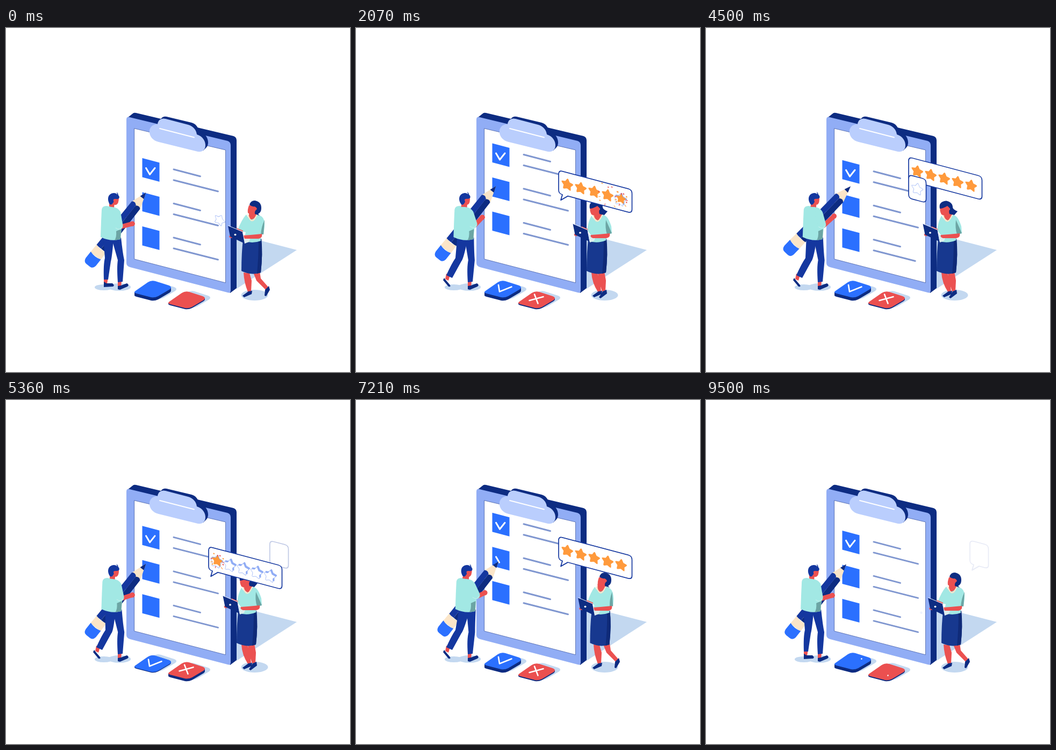
Write an HTML page with a canvas that moves like this. It is 640 px wide and 640 px high and loops after 9570 ms.

```html
<!DOCTYPE html>
<html lang="en">
<head>
<meta charset="utf-8">
<title>Checklist and rating</title>
<style>
html, body { margin: 0; width: 100%; height: 100%; overflow: hidden; background: #fff; }
canvas { display: block; width: 640px; height: 640px; }
</style>
</head>
<body>
<canvas id="stage"></canvas>
<script>
const LOOP = 9.57, ROW = 63.5, SPEED = 2 * ROW / LOOP, SKEW = 0.265;
const BLUE = '#2b70ff', NAVY = '#0d2c82', INK = '#14379f', SKIN = '#eb5151',
  MINT = '#a2e8e4', SHADE = '#6ca5a4', CREAM = '#fbe5c8', PALE = '#91adf5',
  GROUND = '#c3d8f0', ORANGE = '#ff9a3c', LINE = '#8097d0';
const WRITE = [2.2, 6.9]; // when the pencil starts each tick

const canvas = document.getElementById('stage');
const ctx = canvas.getContext('2d');
const dpr = window.devicePixelRatio || 1;
canvas.width = canvas.height = 640 * dpr;

const clamp = x => Math.max(0, Math.min(1, x));
const lerp = (a, b, k) => a + (b - a) * k;
const ramp = (t, a, b) => clamp((t - a) / (b - a));
const smooth = k => k * k * (3 - 2 * k);
const ease = (t, a, b) => smooth(ramp(t, a, b));
const easeOut = k => 1 - (1 - k) ** 3;
const back = k => k <= 0 ? 0 : 1 + 2.2 * (k - 1) ** 3 + 1.2 * (k - 1) ** 2;
// Rises after a, stays at 1, is back at 0 by b
const hold = (t, a, b, d) => ease(t, a, a + d) * (1 - ease(t, b - d, b));

// Blend two path strings that share the same commands
function mix(a, b, k) {
  const nums = b.match(/-?[\d.]+/g);
  let i = 0;
  return a.replace(/-?[\d.]+/g, n => lerp(+n, +nums[i++], k).toFixed(2));
}

function fill(d, color) {
  ctx.fillStyle = color;
  ctx.fill(new Path2D(d));
}

function stroke(d, color, width) {
  ctx.strokeStyle = color;
  ctx.lineWidth = width;
  ctx.stroke(new Path2D(d));
}

function ellipse(x, y, rx, ry, color) {
  ctx.fillStyle = color;
  ctx.beginPath();
  ctx.ellipse(x, y, rx, ry, 0, 0, 7);
  ctx.fill();
}

function at(x, y, draw) {
  ctx.save();
  ctx.translate(x, y);
  draw();
  ctx.restore();
}

// Stroke the part of a polyline between two fractions of its length
function trace(pts, from, to, color, width) {
  if (to <= from) return;
  const seg = pts.slice(1).map((p, i) => Math.hypot(p[0] - pts[i][0], p[1] - pts[i][1]));
  const total = seg.reduce((a, b) => a + b);
  let pos = 0;
  ctx.beginPath();
  seg.forEach((len, i) => {
    const a = clamp((from * total - pos) / len), b = clamp((to * total - pos) / len);
    const point = k => [lerp(pts[i][0], pts[i + 1][0], k), lerp(pts[i][1], pts[i + 1][1], k)];
    if (b > a) {
      ctx.moveTo(...point(a));
      ctx.lineTo(...point(b));
    }
    pos += len;
  });
  ctx.strokeStyle = color;
  ctx.lineWidth = width;
  ctx.stroke();
}

function board() {
  fill('M429 384L541 413L429 485Z', GROUND);
  ellipse(182, 482.5, 17, 5.5, GROUND);
  ellipse(211, 482, 21, 7, GROUND);
  ellipse(462.5, 497, 25, 10, GROUND);
  fill('M226 167L236 159Q238 157 242 158L423 201Q429 203 429 209L429 484L417 493Z', NAVY);
  fill('M224 171Q224 164 230 166L412 210Q418 212 418 218L418 488Q418 494 412 492L231 445Q224 443 224 437Z', PALE);
  const paper = 'M239 187L408.5 227L408.5 474L239 430Z';
  fill(paper, '#fff');
  stroke(paper, '#4760a8', 0.8);
}

function clip() {
  fill('M287 172C289 166 293 164 299 165L345 176C353 178 357 184 359 191C370 195 376 204 376 213C376 221 371 224 367 228Z', NAVY);
  fill('M284 212C262 207 261 179 282 179C283 170 290 167 297 169L339 180C349 183 354 190 355 198C367 202 371 211 371 218C371 227 365 231 357 230Z', '#bacefd');
  stroke('M286 187L350 203.5', '#fff', 2);
}

function row(y, alpha, check, grow, first, second) {
  at(0, y, () => {
    ctx.globalAlpha = alpha;
    at(269.5, 22, () => {
      ctx.scale(grow, grow);
      fill('M-16 -22L16 -13.5L16 22L-16 13.5Z', BLUE);
    });
    trace([[260.5, 18.5], [267.5, 30.5], [277, 18.5]], 0, check, '#fff', 3);
    trace([[312, 21], [361.5, 34]], 0, first, LINE, 3);
    trace([[312, 41], [394.5, 62]], 0, second, LINE, 3);
  });
}

function list(t) {
  const fade = [2.35, 7.5], born = [3.12, 7.6];
  for (let i = 0; i < 5; i++) {
    const alpha = i < 2 ? 1 - ramp(t, fade[i], fade[i] + 0.95) : 1;
    const check = i === 0 ? 1 : i < 3 ? ramp(t - WRITE[i - 1], 0, 0.75) : 0;
    const age = i < 3 ? LOOP : t - born[i - 3];
    if (age < 0 || alpha === 0) continue;
    row(242 + i * ROW - t * SPEED, alpha, check, back(ramp(age, 0, 0.6)),
      easeOut(ramp(age, 0.2, 0.85)), (1 - Math.cos(Math.PI * ramp(age, 0.25, 1.6))) / 2);
  }
}

const TILE = 'M241 489L264 473Q270 469 278 471L303 479Q310 482 305 486L283 499Q277 502 270 501L243 494Q236 492 241 489Z';

function tile(x, base, top, color, marks) {
  at(x + 10, base - 3, () => fill(TILE, GROUND));
  for (let y = base; y > top; y--) at(x, y, () => fill(TILE, NAVY));
  at(x, top, () => {
    fill(TILE, color);
    marks();
  });
}

function tiles(t) {
  const up = clamp(0.6 + 0.8 * Math.cos(2 * Math.PI * (4 * t / LOOP - 0.87)));
  const mark = (pts, on, off, gone) =>
    trace(pts, ease(t, off, gone), ease(t, on, on + 0.5), '#fff', 2.6);
  tile(0, 6, 5 - 5 * up, BLUE, () =>
    mark([[265, 478], [267, 490.5], [289.5, 481.5]], 0.2, 8.2, 9.55));
  tile(63, 22, 17 + 3 * up, '#eb5050', () => {
    mark([[259.5, 487], [285.5, 480]], 0.15, 7.55, 8.3);
    mark([[269, 475.5], [275.5, 492.5]], 0.5, 8.1, 9.55);
  });
}

function pencil(x, y, angle) {
  at(x, y, () => {
    ctx.rotate(angle);
    fill('M0 0L30 -10.5Q34 0 30 10.5Z', CREAM);
    fill('M0 0L12 -4.4L12 4.4Z', NAVY);
    fill('M29 10.5Q25 5 30 0L134 0L134 11.5Z', INK);
    fill('M31 0Q26 -6 31 -10.5L134 -11.5L134 0Z', NAVY);
    fill('M133 -11.5Q137 0 133 11.5L151 12L151 -12Z', CREAM);
    fill('M150 -12Q154 0 150 12L165 12Q173 11 173 4L173 -4Q173 -11 165 -12Z', BLUE);
  });
}

function man(t) {
  // u runs from the moment a tick is started
  const u = t - WRITE[t < 5.2 ? 0 : 1];
  const d = 4 * hold(u, -1.7, 2.65, 0.4) + 7 * hold(u, -0.5, 2.2, 1.3);
  const leave = ease(u, 2.25, 2.65);
  const wiggle = u > 0 && u < 0.4 * Math.PI ? 8 * Math.exp(-0.7 * u) * Math.sin(5 * u) : 0;
  const tx = 260.5 + 9 * (ease(u, 0, 0.6) - leave);
  const ty = 306 - 12 * (ease(u, -1.9, -0.2) - leave) + wiggle;
  const angle = (128.5 + 5.5 * hold(u, 1, 2.65, 0.35)) * Math.PI / 180;
  const hx = tx + 63.5 * Math.cos(angle - 0.26), hy = ty + 63.5 * Math.sin(angle - 0.26);
  const ex = 213 + 1.5 * d, ey = 370 - 0.55 * d;
  const step = hold(t, 0, 9.4, 1.5);
  pencil(tx, ty, angle);

  fill(mix('M182 464L190 464L188 476L182 476Z', 'M168 457L175 460L172 470L166 467Z', step), SKIN);
  fill(mix('M182 472L187 475L198 475Q203 479 199 481L182 482Z', 'M164 465L168 470L174 477Q178 482 172 481L162 469Z', step), NAVY);
  fill(mix(`M${181 + d} 389L${200 + d} 394Q197 428 195 434L190 468L182 468Q181 440 184 428Z`,
    `M${183 + d} 389L${202 + d} 394Q200 430 196 434L179 465L168 460Q178 438 185 428Z`, step), INK);
  fill('M208 470L215 470L214 483L208 483Z', SKIN);
  fill('M208 480L214 479L225 475Q230 478 226 481L212 487L208 486Z', NAVY);
  fill(`M${197 + d} 393L${214 + d} 390Q${217 + d / 2} 418 ${220 + d / 6} 432L217 472L208 473Q206 445 ${208 + d / 6} 432Z`, INK);

  ctx.lineCap = 'round';
  stroke(`M${ex} ${ey}L${hx} ${hy}`, SKIN, 8.5);
  ellipse(hx, hy, 4.8, 4.8, SKIN);
  at(d, 0, () => {
    fill('M192 325L202 324L201 335Q194 337 192 331Z', SKIN);
    fill('M178 338Q179 331 187 331L203 334Q211 336 213 345L215 372L213 393Q195 398 176 389L177 360Z', MINT);
    fill('M214 374L213 393L202 395Q206 389 205 378Z', SHADE);
  });
  stroke(`M${206 + d} 345L${ex - 3} ${ey - 2}`, MINT, 15);
  stroke(`M${ex - 9} ${ey + 2}Q${ex} ${ey + 8} ${ex + 2} ${ey}`, '#d4f3ef', 0.8);

  at(200 + 0.075 * d * d, 318, () => {
    ctx.rotate(-0.1 * Math.sin(Math.PI * d / 9));
    ctx.translate(-200, -318);
    fill('M199 316L210 315Q210 327 205 329L201 329L200 333L192 332L194 324Z', SKIN);
    fill('M193 328C188 320 189 311 196 308C201 306 205 307 207 310L206 305Q209 308 209 311C212 314 211 318 208 318C205 319 203 317 200 319C199 322 202 324 199 325C198 328 196 329 193 328Z', INK);
  });
}

function woman(t) {
  // Hips turn first, then legs and head, the laptop follows last
  const body = hold(t, 0, 7.6, 1.1), turn = hold(t, 0.3, 7.2, 1.6), reach = hold(t, 1, 6.8, 1);

  fill(mix('M460 455L472 453L474 466L488 482L484 488L466 470Z', 'M450 456L462 453L465 470L464 489L458 490L452 472Z', turn), SKIN);
  fill(mix('M442 455L453 456L457 470L456 490L450 491Q443 474 442 455Z', 'M438 455L449 456L454 470L456 490L450 491Q439 474 438 455Z', turn), SKIN);
  fill(mix('M481 498L482 487L489 480L491 487L484 499Z', 'M452 501L459 490L466 487L467 494L455 503Z', turn), NAVY);
  fill('M440 498L451 490L458 489L457 495L443 501Z', NAVY);
  at(-9 * body, 0, () => {
    fill('M441 393L475 392Q478 420 474 455Q456 461 438 452Q438 420 441 393Z', '#17388f');
    fill('M470 395L475 392Q478 420 474 455L467 457Q470 425 470 395Z', '#0f2a78');
    fill('M452 342L468 342L466 354Q459 363 452 352Z', SKIN);
  });
  fill(mix('M447 347Q457 366 467 346L476 351Q482 356 481 370L479 384L474 384L474 396Q458 402 442 396L446 380L431 376Q438 357 447 347Z',
    'M438 349Q449 368 460 347L466 351Q471 356 475 369L476 382L467 384L465 395Q448 402 433 396L437 385L430 376Q432 360 438 349Z', body), MINT);
  fill(mix('M481 357L479 384L474 384Q475 370 481 357Z', 'M465 357L476 382L467 384Q463 372 465 357Z', body), SHADE);
  ctx.lineCap = 'butt';
  at(-9 * body, body, () => stroke('M450 347Q457 370 467 347', CREAM, 2.2));
  at(-9.5 * reach, -3 * reach, () => fill('M429 372L441 377L440 383L430 378Z', SKIN));
  at(-9 * reach, -2 * reach, () => fill('M443 389L455 390L452 398L444 401Z', '#dceeee'));
  at(-4 * reach, -reach, () => fill('M476 383Q478 390 470 392L445 392Q439 390 441 386L455 385Z', SKIN));
  at(-9.5 * reach, -3.5 * reach, () => {
    fill('M415 387L420 385L421 391L416 390Z', SKIN);
    fill('M413 368L440 379.5L444 401L417 388Z', NAVY);
    stroke('M413 367.5L440.5 379L444.5 401', '#e8eefc', 1);
    ellipse(426.5, 384.5, 2, 1.7, '#fff');
  });

  fill(mix('M452 330Q449 338 450 344L457 348L468 340L466 327Z', 'M436 332Q434 340 438 347L446 350L454 342L452 328Z', turn), SKIN);
  fill(mix('M453 329Q455 321 463 321Q475 323 475 335Q475 343 469 346L472 349L463 346Q462 340 467 337Q466 333 462 332Q458 333 453 329Z',
    'M435 336Q432 323 447 321.5Q459 324 459 334Q460 338 468 341L462 348L453 346Q451 340 454 337Q452 333 449 331Q441 336 435 336Z', turn), NAVY);
}

function star(x, y, size, turn, color, edge) {
  ctx.beginPath();
  for (let i = 0; i < 10; i++) {
    const r = (i % 2 ? 5.3 : 9.8) * size, a = turn + i * Math.PI / 5 - Math.PI / 2;
    ctx.lineTo(x + r * Math.cos(a), y + r * Math.sin(a));
  }
  ctx.closePath();
  ctx.lineJoin = 'round';
  const outline = (style, width) => {
    ctx.strokeStyle = style;
    ctx.lineWidth = width * size;
    ctx.stroke();
  };
  outline(edge || color, 3);
  if (edge) outline(color, 1.6);
  ctx.fillStyle = color;
  ctx.fill();
}

function confetti(x, y, age) {
  const k = ramp(age, 0, 0.42);
  if (k <= 0 || k >= 1) return;
  at(x, y, () => {
    ctx.globalAlpha = 1 - k ** 4;
    for (let i = 0; i < 11; i++) {
      const a = i * 2.4, r = 5 + easeOut(k) * (10 + i * 5 % 9);
      const px = r * Math.cos(a), py = r * Math.sin(a), color = i % 2 ? ORANGE : SKIN;
      if (i % 3) ellipse(px, py, 1.3, 1.3, color);
      else stroke(`M${px} ${py}l${3 * Math.cos(a)} ${3 * Math.sin(a)}`, color, 1.2);
    }
  });
}

function balloon(w, h, tail) {
  const d = `M0 7Q0 0 7 0H${w - 7}Q${w} 0 ${w} 7V${h - 7}Q${w} ${h} ${w - 7} ${h}H17L${12 - 8 * tail} ${h + 11 * tail}L7 ${h}Q0 ${h} 0 ${h - 7}Z`;
  fill(d, '#fff');
  stroke(d, INK, 1.7);
}

function rating(i, x, y, b, size) {
  // The first star flies up from the laptop
  const rise = i ? 0 : 1 - easeOut(ramp(b, -0.12, 0.38));
  const entry = i ? 1 : ease(b, -0.1, 0.02);
  const depth = ease(b, 0.7, 1.05), age = b - 1.2 - 0.2 * i, lit = ramp(age, 0, 0.25);
  if (lit < 1) {
    if (depth > 0) star(x, y, size, 0.1, PALE);
    star(x + 10 * rise - 2.5 * depth, y + 130 * rise + 3 * depth, size * entry, 0.1 + 0.6 * rise, '#fff', PALE);
  }
  if (lit > 0) star(x, y, size * back(lit), 0.08, ORANGE);
  confetti(x, y, age);
}

function bubble(b) {
  if (b < -0.1 || b > 5.48) return;
  const top = 273 - 10.1 * Math.max(0, b - 1.25);
  const pop = ease(b, 0.16, 0.38);
  const shift = 114 * ease(b, 4.6, 5.38), left = 377 + shift;
  const right = lerp(409.5, 513.5, ease(b, 0.5, 0.95)) + 12 * ease(b, 4.85, 5.38);
  at(left, top + SKEW * shift, () => {
    ctx.globalAlpha = 1 - 0.9 * ramp(b, 5.1, 5.42) - 0.1 * ramp(b, 5.42, 5.48);
    ctx.transform(1, SKEW, 0, 1, 0, 0);
    if (pop > 0) at(17 - 17 * pop, 22 - 22 * pop, () => {
      ctx.scale(pop, pop);
      balloon(right - left, 43.5, ease(b, 0.55, 0.9));
    });
    for (let i = 0; i < 5; i++) {
      const x = 16 + 25 * i - shift;
      const open = i ? ease(right, 390 + 25 * i, 412 + 25 * i) : 1;
      const size = open * ease(x, 2, 16);
      if (size > 0) rating(i, x, 22.5, b, size);
    }
  });
}

function draw(t) {
  ctx.setTransform(dpr, 0, 0, dpr, 0, 0);
  ctx.fillStyle = '#fff';
  ctx.fillRect(0, 0, 640, 640);
  ctx.lineCap = ctx.lineJoin = 'round';
  board();
  list(t);
  clip();
  tiles(t);
  man(t);
  woman(t);
  ctx.lineCap = 'round';
  bubble(t > 9.46 ? t - LOOP : t);
  bubble(t - 4.08);
}

const start = performance.now();
function tick() {
  draw((performance.now() - start) / 1000 % LOOP);
  requestAnimationFrame(tick);
}
tick();
</script>
</body>
</html>
```
